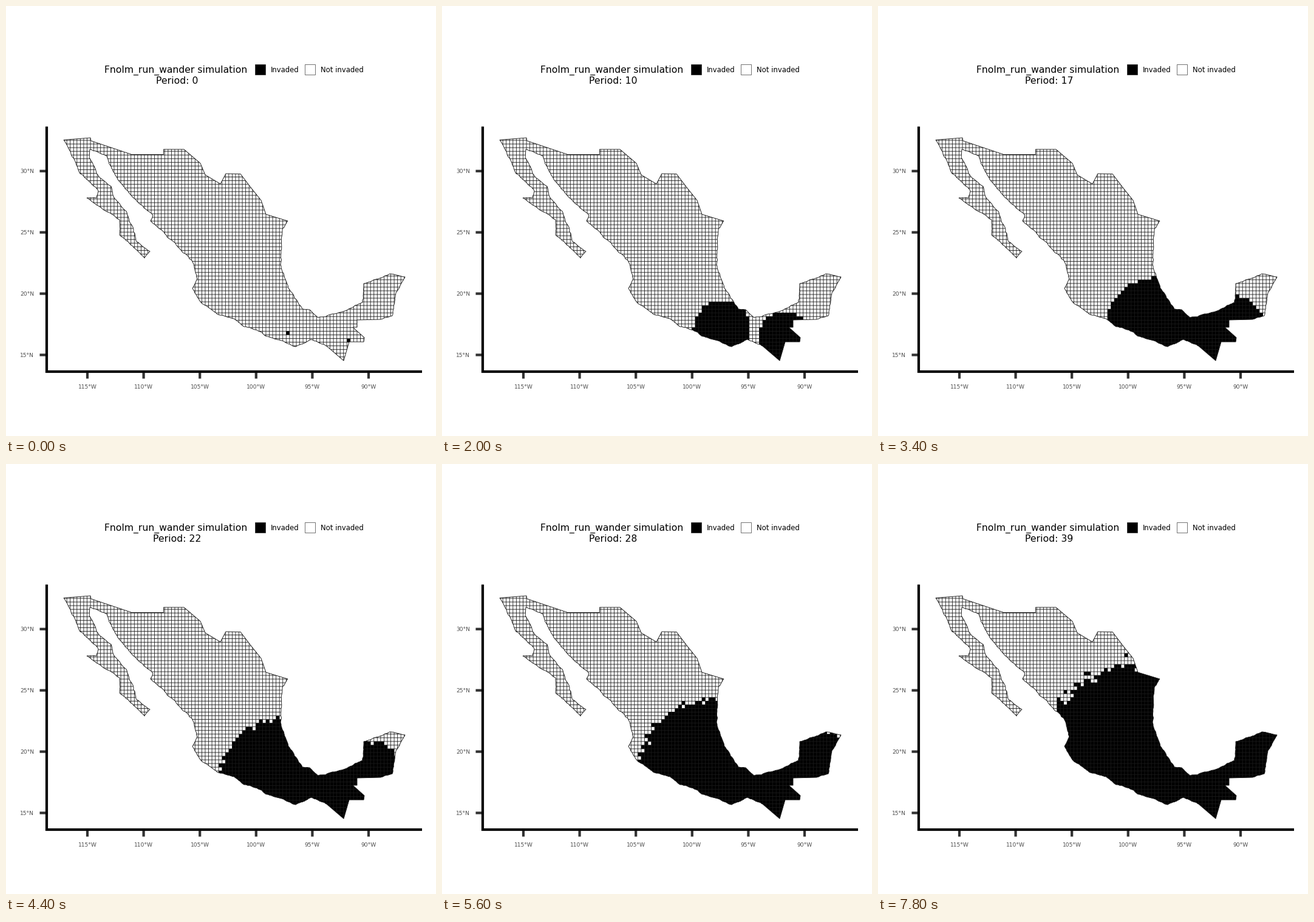
Write a matplotlib script that moves like this. It is 708 px wide and 708 px high and loops after 8 s.

```python
import numpy as np
import matplotlib.pyplot as plt
from matplotlib.animation import FuncAnimation
from matplotlib.collections import LineCollection, PolyCollection
from matplotlib.patches import PathPatch, Rectangle
from matplotlib.path import Path

SIZE, DPI = 708, 100
PERIODS, STEP_MS = 40, 200
INK, TICK, LABEL = "#1a1a1a", "#333333", "#4d4d4d"

# Grid of 0.3 degree cells, counted from the south-west corner
LEFT, BOTTOM = 94.6, 583.8
CELL_W, CELL_H = 5.556, 6.045
COLS, ROWS = 102, 61

# Key bends of the outline, clockwise; coasts are roughened below
BORDER = [(95, 220.5), (139, 217), (140, 222), (207, 244.5), (259.5, 244.5),
          (259.5, 236), (293, 236), (320, 259), (328, 278), (353, 293),
          (362, 276), (386, 276.5), (404, 300), (420, 320), (428, 343)]
GULF = [(464, 354), (455, 368), (452, 425), (462, 455), (488, 499),
        (500, 500), (514, 513), (561, 501), (587, 488), (589, 457),
        (632, 441), (657, 446), (642, 472), (636, 510), (617, 516)]
SOUTH = [(578, 517), (578, 529), (571, 529), (590, 546), (589, 553),
         (565, 553), (556, 584)]
PACIFIC = [(528, 560), (503, 549), (477, 561), (437, 546), (392, 528),
           (376, 515), (349, 508), (320, 487), (307, 465), (315, 449),
           (305, 418), (265, 380), (238, 354), (242, 345), (216, 322),
           (185, 287), (170, 260), (166, 247), (138, 236)]
BAJA = [(137, 250), (155, 283), (173, 297), (177, 314), (198, 338),
        (214, 387), (237, 404), (228, 415), (187, 377), (187, 352),
        (133, 316), (149, 316), (152, 305), (122, 276), (95, 220.5)]

rng = np.random.default_rng(7)


def px(width):
    return width * 72 / DPI


def rough(points, levels=4, jag=0.02):
    """Turn straight runs into a coast by midpoint displacement."""
    points = np.array(points, float)
    for level in range(levels):
        a, b = points[:-1], points[1:]
        normal = (b - a)[:, ::-1] * [1, -1]
        shift = rng.normal(0, jag * 1.5 ** level, (len(a), 1))
        finer = np.empty((2 * len(points) - 1, 2))
        finer[::2] = points
        finer[1::2] = (a + b) / 2 + shift * normal
        points = finer
    return points


def spread(col, row, seed, east=0.956, west=0.956):
    """Distance of cells from a seed, on a slightly squared circle."""
    dx, dy = col - seed[0], row - seed[1]
    dx = np.where(dx > 0, dx * east, dx * west)
    return (np.abs(dx) ** 2.4 + np.abs(dy) ** 2.4) ** (1 / 2.4)


def front(period):
    return 0.8 * period ** 1.03


def cell(col, row):
    x, y = LEFT + col * CELL_W, BOTTOM - row * CELL_H
    return [(x, y), (x + CELL_W, y), (x + CELL_W, y - CELL_H), (x, y - CELL_H)]


plt.rcParams["font.family"] = "DejaVu Sans"
fig = plt.figure(figsize=(SIZE / DPI, SIZE / DPI), dpi=DPI, facecolor="white")
ax = fig.add_axes([0, 0, 1, 1])
ax.set_xlim(0, SIZE)
ax.set_ylim(SIZE, 0)
ax.axis("off")


def write(x, y, text, size, color="black", **kw):
    return ax.text(x, y, text, fontsize=px(size), color=color, **kw)


def bar(xs, ys, color):
    ax.plot(xs, ys, color=color, lw=px(4.2), solid_capstyle="butt", snap=False)


# Map
land = Path(np.vstack([BORDER, rough(GULF), SOUTH, rough(PACIFIC),
                       rough(BAJA)]))

cols, rows = [g.ravel() for g in np.meshgrid(np.arange(COLS), np.arange(ROWS))]
cells = np.array([cell(c, r) for c, r in zip(cols, rows)])
reach = np.minimum(spread(cols, rows, (66, 7), east=1.1),
                   1.16 * spread(cols, rows, (84, 5)))
reach = reach * (1 + rng.normal(0, 0.028, reach.size) * np.minimum(1, reach / 20))

invaded = PolyCollection([], facecolors="black", edgecolors="none",
                         antialiaseds=False, zorder=1)
ax.add_collection(invaded)
invaded.set_clip_path(land, ax.transData)

xs = LEFT + np.arange(COLS + 1) * CELL_W
ys = BOTTOM - np.arange(ROWS + 1) * CELL_H
lines = [[(x, ys[0]), (x, ys[-1])] for x in xs]
lines += [[(xs[0], y), (xs[-1], y)] for y in ys]
grid = LineCollection(lines, colors=INK, linewidths=px(0.85), zorder=2)
grid.set_snap(False)
ax.add_collection(grid)
grid.set_clip_path(land, ax.transData)
ax.add_patch(PathPatch(land, fc="none", ec=INK, lw=px(0.9), zorder=3))

# Axes
bar([67, 67], [198.5, 604], "black")
bar([65, 685], [602, 602], "black")
for i in range(6):
    x = 134 + i * 92.6
    bar([x, x], [604, 613.5], TICK)
    write(x, 627.5, f"{115 - 5 * i}°W", 9.1, LABEL, ha="center", va="center")
for i in range(4):
    y = 271.8 + i * 100.9
    bar([55.5, 65], [y, y], TICK)
    write(46, y + 0.5, f"{30 - 5 * i}°N", 9.1, LABEL, ha="right", va="center")

# Legend
write(280, 110, "Fnolm_run_wander simulation", 15.6, ha="center")
caption = write(282, 128, "", 15.6, ha="center")
for x, fill, name in [(409.8, "black", "Invaded"),
                      (491.8, "white", "Not invaded")]:
    ax.add_patch(Rectangle((x, 96.3), 17.2, 17.2, fc=fill, ec=INK, lw=px(0.6)))
    write(x + 26, 109, name, 11.6)


def draw(period):
    invaded.set_verts(cells[reach <= front(period)])
    caption.set_text(f"Period: {period}")
    return invaded, caption


anim = FuncAnimation(fig, draw, frames=PERIODS, interval=STEP_MS,
                     repeat=True, repeat_delay=0)
plt.show()
```
